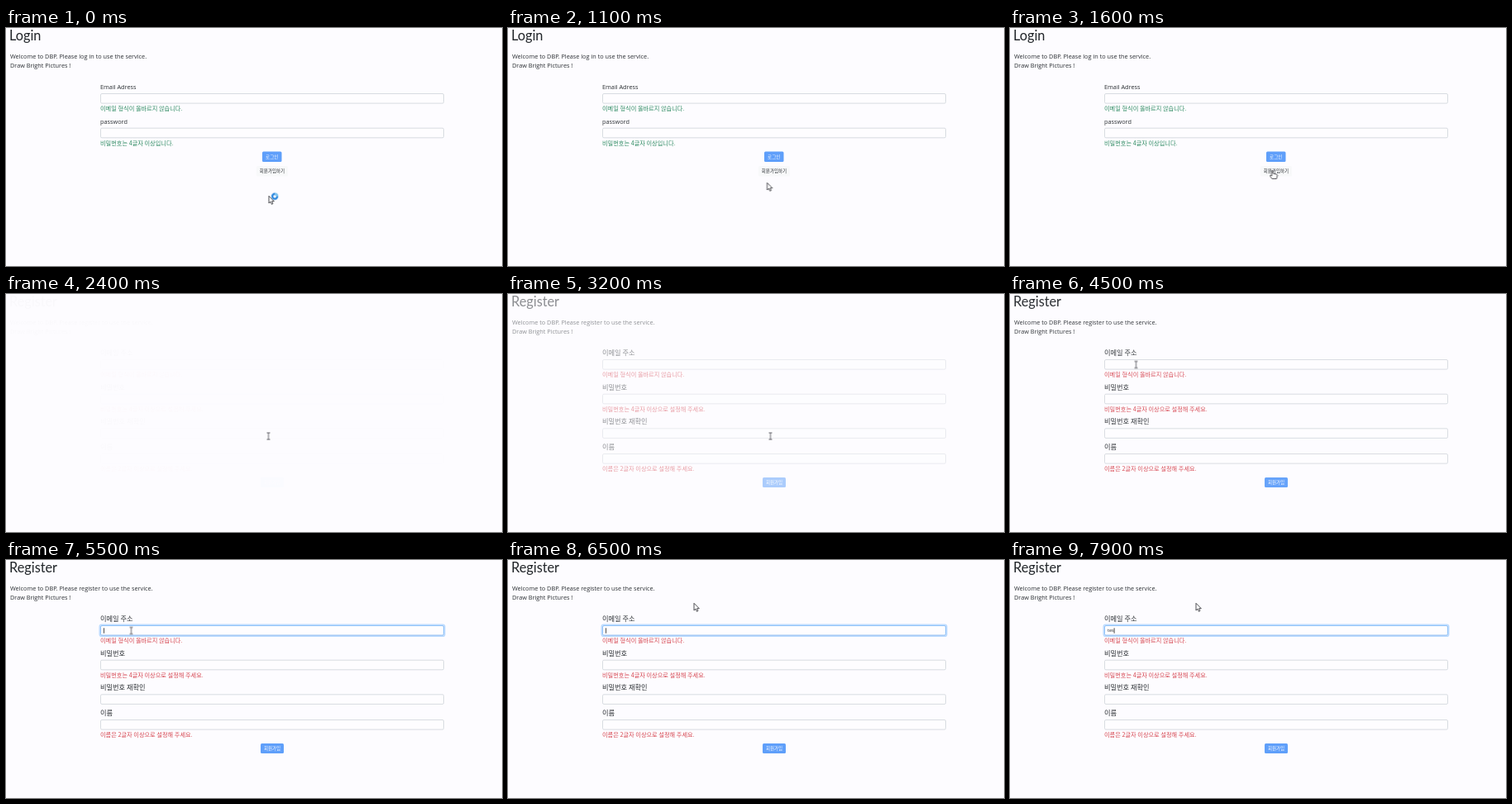
An HTML page for the animation above (8000 ms loop, 600 px wide and 288 px high).

```html
<!DOCTYPE html>
<html>
<head>
<meta charset="utf-8">
<title>Register</title>
<style>
html, body { margin: 0; width: 100%; height: 100%; overflow: hidden; background: #fdfcff; }
svg { display: block; width: 100vw; height: 100vh; }
text { font-family: "Open Sans", "Noto Sans CJK KR", "Noto Sans CJK", sans-serif; font-size: 7.3px; fill: #2b2f33; }
.title { font-family: Lato, sans-serif; font-size: 16.3px; fill: #212529; }
.ko { font-family: "Noto Sans CJK KR", "Noto Sans CJK", sans-serif; font-size: 8.2px; }
.note { font-family: "Noto Sans CJK KR", "Noto Sans CJK", sans-serif; font-size: 7.2px; }
.ok { fill: #2e8b62; }
.bad { fill: #d6454f; }
.btn { font-family: "Noto Sans CJK KR", "Noto Sans CJK", sans-serif; font-size: 5.5px; text-anchor: middle; }
.white { fill: #fff; }
.typed { font-size: 5.5px; }
.field { fill: #fefdff; stroke: #ced4da; stroke-width: .8; }
.blue { fill: #5f9ffa; }
.pale { fill: #f8f9fa; }
.glow { fill: none; stroke: #007bff; stroke-opacity: .25; stroke-width: 1.6; }
.edge { fill: none; stroke: #80bdff; stroke-width: .8; }
.arrow, .hand { fill: #fff; stroke: #25252b; stroke-width: .8; stroke-linejoin: round; }
.beam { fill: none; stroke: #55555c; stroke-width: .9; }

/* one shared 8 s clock, so 1% is 80 ms */
.login, .register, .focus, .pointer, .arrow, .hand, .beam, .busy,
.caret, .t1, .t2, .t3 { animation: 8s step-end infinite; }

.login { animation-name: login; }
@keyframes login { 0% { opacity: 1 } 30%, 100% { opacity: 0 } }

.register { animation-name: register; animation-timing-function: ease; }
@keyframes register { 0%, 28.75% { opacity: 0 } 66.25%, 100% { opacity: 1 } }

.focus { animation-name: focus; animation-timing-function: ease-in-out; }
@keyframes focus { 0%, 66.5% { opacity: 0 } 68.4%, 100% { opacity: 1 } }

.pointer { animation-name: pointer; animation-timing-function: ease-in-out; }
@keyframes pointer {
  0%, 4% { transform: translate(318px, 203px) }
  11.25%, 14% { transform: translate(313.5px, 187px) }
  20%, 41.25% { transform: translate(317.5px, 172px) }
  48.75% { transform: translate(210px, 112px) }
  55.5%, 57.5% { transform: translate(152.5px, 85.5px) }
  66%, 71% { transform: translate(151.5px, 85.5px) }
  78.75%, 100% { transform: translate(225px, 52px) }
}

.arrow { animation-name: arrow; }
@keyframes arrow {
  0% { opacity: 1 } 17.1% { opacity: 0 }
  43% { opacity: 1 } 53% { opacity: 0 }
  73.3%, 100% { opacity: 1 }
}
.hand { animation-name: hand; }
@keyframes hand { 0% { opacity: 0 } 17.1% { opacity: 1 } 30%, 100% { opacity: 0 } }
.beam { animation-name: beam; }
@keyframes beam {
  0% { opacity: 0 } 30% { opacity: 1 } 43% { opacity: 0 }
  53% { opacity: 1 } 73.3%, 100% { opacity: 0 }
}
.busy { animation-name: busy; }
@keyframes busy { 0% { opacity: 1 } 11.25%, 100% { opacity: 0 } }
.spin { animation: spin 1s linear infinite; }
@keyframes spin { to { transform: rotate(360deg) } }

.caret { animation-name: caret; }
@keyframes caret {
  0% { opacity: 0; transform: none }
  67.5% { opacity: 1 } 73.75% { opacity: 0 }
  80% { opacity: 1 } 86.25% { opacity: 0; transform: none }
  91.25% { opacity: 1; transform: translateX(2px) }
  93.75% { opacity: 1; transform: translateX(5px) }
  98.75%, 100% { opacity: 1; transform: translateX(7.6px) }
}
.t1 { animation-name: t1; }
.t2 { animation-name: t2; }
.t3 { animation-name: t3; }
@keyframes t1 { 0% { opacity: 0 } 91.25% { opacity: 1 } 93.75%, 100% { opacity: 0 } }
@keyframes t2 { 0% { opacity: 0 } 93.75% { opacity: 1 } 98.75%, 100% { opacity: 0 } }
@keyframes t3 { 0% { opacity: 0 } 98.75%, 100% { opacity: 1 } }
</style>
</head>
<body>
<svg viewBox="0 0 600 288">
  <defs>
    <rect id="field" x="114.5" width="415" height="11.6" rx="1.5"/>
  </defs>

  <g class="login">
    <text class="title" x="4" y="15">Login</text>
    <text x="5" y="37">Welcome to DBP. Please log in to use the service.</text>
    <text x="5" y="48">Draw Bright Pictures !</text>
    <text x="114" y="74">Email Adress</text>
    <use href="#field" class="field" y="79.5"/>
    <text class="note ok" x="114" y="99.7">이메일 형식이 올바르지 않습니다.</text>
    <text x="114" y="115.6">password</text>
    <use href="#field" class="field" y="121.2"/>
    <text class="note ok" x="114" y="141.7">비밀번호는 4글자 이상입니다.</text>
    <rect class="blue" x="310" y="149.5" width="23.5" height="12.5" rx="1.5"/>
    <text class="btn white" x="321.7" y="157.8">로그인</text>
    <rect class="pale" x="303" y="167" width="38" height="12.5" rx="1.5"/>
    <text class="btn" x="322" y="175.2">회원가입하기</text>
  </g>

  <g class="register">
    <text class="title" x="4" y="15">Register</text>
    <text x="5" y="37">Welcome to DBP. Please register to use the service.</text>
    <text x="5" y="48">Draw Bright Pictures !</text>
    <text class="ko" x="114" y="74">이메일 주소</text>
    <use href="#field" class="field" y="79.5"/>
    <text class="note bad" x="114" y="99.7">이메일 형식이 올바르지 않습니다.</text>
    <text class="ko" x="114" y="116">비밀번호</text>
    <use href="#field" class="field" y="121.2"/>
    <text class="note bad" x="114" y="141.7">비밀번호는 4글자 이상으로 설정해 주세요.</text>
    <text class="ko" x="114" y="157.3">비밀번호 재확인</text>
    <use href="#field" class="field" y="162.8"/>
    <text class="ko" x="114" y="188">이름</text>
    <use href="#field" class="field" y="193.5"/>
    <text class="note bad" x="114" y="213.7">이름은 2글자 이상으로 설정해 주세요.</text>
    <rect class="blue" x="308" y="222" width="28" height="12" rx="1.5"/>
    <text class="btn white" x="322" y="230">회원가입</text>
  </g>

  <g class="focus">
    <rect class="glow" x="113.3" y="78.3" width="417.4" height="14" rx="2.3"/>
    <use href="#field" class="edge" y="79.5"/>
  </g>
  <text class="typed t1" x="118" y="87.4">t</text>
  <text class="typed t2" x="118" y="87.4">te</text>
  <text class="typed t3" x="118" y="87.4">tes</text>
  <rect class="caret" x="118" y="82.3" width=".8" height="6.4" fill="#222"/>

  <g class="pointer">
    <path class="arrow" d="M0 .3V9L2 7.2 3.4 10.3 4.9 9.6 3.6 6.7H6.3Z"/>
    <path class="hand" d="M-.8 .8Q0-.6.8.8V4L5 5.1Q6 5.5 5.8 6.6L5 10.4H-.6L-3.2 6.8Q-3 5.6-1.8 6.2L-.8 7Z"/>
    <path class="beam" d="M-2-4H2M0-4V4M-2 4H2"/>
    <g class="busy">
      <g transform="translate(7.2 .7)">
        <g class="spin" fill="none" stroke-width="2.4">
          <circle r="3" stroke="#2a86dd"/>
          <path d="M0-3A3 3 0 0 1 3 0" stroke="#7fc4ee"/>
        </g>
      </g>
    </g>
  </g>
</svg>
</body>
</html>
```
